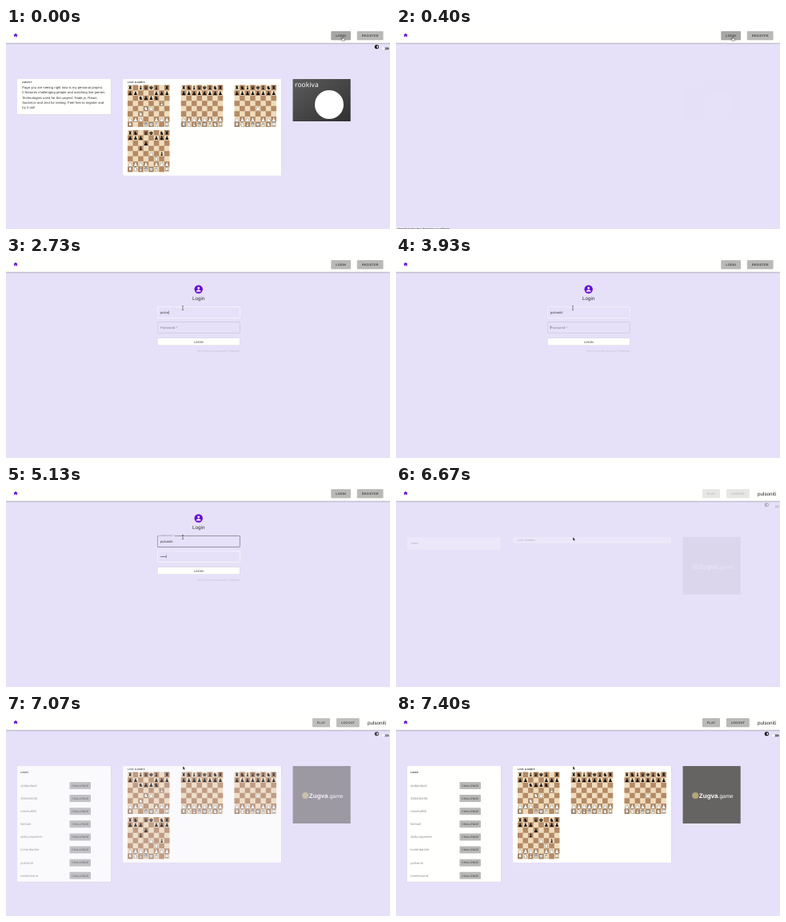
An HTML page that plays this animation: 480x252 px, repeating every 7470 ms.

```html
<!DOCTYPE html>
<html lang="en">
<head>
<meta charset="utf-8">
<title>Chess project login</title>
<style>
  html, body { margin: 0; width: 100%; height: 100%; overflow: hidden; background: #e6e1f8; }
  svg { display: block; width: 480px; height: 252px; }
  text {
    font: 4.16px "Liberation Sans", Arial, sans-serif;
    letter-spacing: .039px; fill: #333; text-rendering: geometricPrecision; white-space: pre;
  }
  .mid { text-anchor: middle; }
  .btn rect { fill: #b9b9b7; }
  .btn text { font-size: 3.9px; font-weight: bold; letter-spacing: .11px; fill: #4a4a4a; text-anchor: middle; }
  .btn.small text { font-size: 3.38px; font-weight: normal; letter-spacing: .09px; fill: #333; }
  .head { font-size: 3.12px; font-weight: bold; letter-spacing: .26px; }
  .card { fill: #fffffd; filter: drop-shadow(0 .6px .7px #0005); }
  .bar { fill: #fffffd; filter: drop-shadow(0 .6px .8px #0008); }
  .title { font-size: 6.24px; }
  .user { fill: #8c8c8c; }
  .piece { font: 6.5px "DejaVu Sans", sans-serif; letter-spacing: 0; text-anchor: middle; fill: #111; }
  .piece.w { fill: #fff; stroke: #444; stroke-width: .45px; paint-order: stroke; }

  .a, .a * { animation-timing-function: linear; }
  .a { animation-duration: 7470ms; animation-iteration-count: infinite; }

  .guest { animation-name: guest; }
  .form { animation-name: form; }
  .member { animation-name: member; }
  .photo { animation-name: photo; }
  .games { animation-name: games; }
  .list { animation-name: list; }
  .out { animation-name: out; }
  .in { animation-name: in; }
  .name { animation-name: name; }
  .hover { animation-name: hover; }
  .status { animation-name: status; }
  .mouse { animation-name: mouse; }
  .hand { animation-name: hand; }
  .beam { animation-name: beam; }
  .arrow { animation-name: arrow; }
  .box { fill: none; stroke: #aba6bb; stroke-width: .35px; }
  .box1 { animation-name: box1; }
  .box2 { animation-name: box2; }
  .label { fill: #817d8e; }
  .label1 { animation-name: label1; }
  .label2 { animation-name: label2; }
  .notch { fill: #e6e1f8; }
  .notch1 { animation-name: notch1; }
  .notch2 { animation-name: notch2; }

  @keyframes guest { 0%, .9% { opacity: 1 } 5.4%, 100% { opacity: 0 } }
  @keyframes form { 0%, 7% { opacity: 0 } 12.4% { opacity: .84 } 13.4%, 84.2% { opacity: 1 } 88%, 100% { opacity: 0 } }
  @keyframes member { 0%, 88% { opacity: 0 } 89.25%, 92.75% { opacity: .25 } 92.76% { opacity: .65 } 97.5%, 100% { opacity: 1 } }
  @keyframes photo { 0%, 88% { opacity: 0 } 89.25%, 92.75% { opacity: .08 } 92.76% { opacity: .36 } 98.5%, 100% { opacity: 1 } }
  @keyframes games { 0%, 92.75% { opacity: 0 } 92.76%, 100% { opacity: 1 } }
  @keyframes list { 0%, 93.68% { opacity: 0 } 93.69%, 100% { opacity: 1 } }
  @keyframes out { 0%, 84.2% { opacity: 1 } 87.5%, 100% { opacity: 0 } }
  @keyframes in { 0%, 88% { opacity: 0 } 89.25%, 92.75% { opacity: .35 } 92.76% { opacity: .82 } 96%, 100% { opacity: 1 } }
  @keyframes name { 0%, 88.3% { opacity: 0 } 88.31%, 100% { opacity: 1 } }
  @keyframes hover { 0%, 10.5% { opacity: .1 } 12.4% { opacity: .07 } 14.3%, 100% { opacity: 0 } }
  @keyframes status { 0%, 2.6% { opacity: 0 } 4.4%, 19.6% { opacity: 1 } 24%, 100% { opacity: 0 } }
  @keyframes mouse {
    0%, 8% { transform: translate(420.6px, 11.2px); animation-timing-function: ease-in-out }
    12.4%, 100% { transform: translate(221px, 64px) }
  }
  @keyframes hand { 0%, 8.7% { opacity: 1 } 8.71%, 100% { opacity: 0 } }
  @keyframes beam { 0%, 11.7% { opacity: 0 } 11.71%, 87.4% { opacity: 1 } 87.41%, 100% { opacity: 0 } }
  @keyframes arrow { 0%, 8.7% { opacity: 0 } 8.71%, 11.7% { opacity: 1 } 11.71%, 87.4% { opacity: 0 } 87.41%, 100% { opacity: 1 } }
  @keyframes box1 {
    0%, 11.7% { stroke: #aba6bb; stroke-width: .35px }
    11.71%, 15% { stroke: #33313c; stroke-width: .45px }
    16%, 52.6% { stroke: #fff; stroke-width: .6px }
    53.4%, 100% { stroke: #33313c; stroke-width: .45px }
  }
  @keyframes box2 { 0%, 52.6% { stroke: #aba6bb; stroke-width: .35px } 53.4%, 100% { stroke: #fff; stroke-width: .6px } }
  @keyframes label1 {
    0%, 15.1% { transform: translate(192.9px, 71px); fill: #817d8e }
    17.7%, 52.6% { transform: translate(192.9px, 63.4px) scale(.75); fill: #fff }
    53.4%, 100% { transform: translate(192.9px, 63.4px) scale(.75); fill: #817d8e }
  }
  @keyframes label2 {
    0%, 52.6% { transform: translate(192.9px, 89.6px); fill: #817d8e }
    54.4%, 100% { transform: translate(192.9px, 82.2px) scale(.75); fill: #fff }
  }
  @keyframes notch1 { 0%, 15.1% { opacity: 0 } 17.7%, 100% { opacity: 1 } }
  @keyframes notch2 { 0%, 52.6% { opacity: 0 } 54.4%, 100% { opacity: 1 } }
</style>
</head>
<body>
<svg viewBox="0 0 480 252">
  <defs>
    <linearGradient id="slate" x1="0" y1="0" x2="1" y2="1">
      <stop offset="0" stop-color="#5c5c5c"/><stop offset="1" stop-color="#303030"/>
    </linearGradient>
    <g id="boards"></g>
    <g id="theme">
      <circle cx="463.4" cy="23.6" r="2.7" fill="#16161c"/>
      <path d="M463.6 22a1.6 1.6 0 0 1 0 3.2z" fill="#fff"/>
      <rect x="472" y="24.2" width="7" height="3" rx="1.5" fill="#77747f"/>
      <circle cx="471.8" cy="25.6" r="2.2" fill="#f8f7fc" stroke="#0002" stroke-width=".3"/>
    </g>
  </defs>
  <rect width="480" height="252" fill="#e6e1f8"/>

  <g class="a guest">
    <use href="#theme"/>
    <rect class="card" x="14" y="64" width="117.5" height="44.4" rx="1"/>
    <text class="head" x="20.2" y="69">ABOUT</text>
    <g id="about"></g>
    <rect class="card" x="146" y="64" width="198.3" height="121" rx="1"/>
    <text class="head" x="152" y="69">LIVE GAMES</text>
    <use href="#boards"/>
    <rect x="358.5" y="64" width="72.2" height="53" fill="url(#slate)"/>
    <circle cx="404" cy="96" r="18" fill="#fff"/>
    <text x="361" y="74" style="font: 8.5px 'Noto Sans', sans-serif; fill: #fff">rookiva</text>
  </g>

  <g class="a member">
    <use href="#theme"/>
    <rect class="card" x="14" y="64" width="117.5" height="16" rx="1"/>
    <g class="a list">
      <rect class="card" x="14" y="64" width="117.5" height="145.4" rx="1"/>
      <g id="users"></g>
    </g>
    <text class="head" x="18.3" y="72.8">USER</text>
    <rect class="card" x="146" y="64" width="198.3" height="8.6" rx="1"/>
    <g class="a games">
      <rect class="card" x="146" y="64" width="198.3" height="121" rx="1"/>
      <use href="#boards"/>
    </g>
    <text class="head" x="152" y="69">LIVE GAMES</text>
  </g>
  <g class="a photo">
    <rect x="358.5" y="64" width="72.2" height="72" fill="#666463"/>
    <circle cx="374.2" cy="101" r="4" fill="#b3a678"/>
    <text x="378.8" y="104" style="font-size: 8px; font-weight: bold; fill: #fff">Zugva<tspan style="font-size: 6.8px; font-weight: normal">.game</tspan></text>
  </g>

  <g class="a form">
    <circle cx="240.7" cy="40.5" r="5.2" fill="#6808d8"/>
    <circle cx="240.7" cy="39" r="1.45" fill="#fff"/>
    <path d="M237.8 43.4c0-1.8 1.9-2.5 2.9-2.5s2.9.7 2.9 2.5z" fill="#fff"/>
    <text class="title mid" x="240.7" y="54">Login</text>

    <rect class="a box box1" x="189.3" y="62.6" width="103.1" height="13.9" rx="1"/>
    <rect class="a notch notch1" x="191.8" y="61.8" width="18.6" height="1.5"/>
    <text class="a label label1">Username *</text>
    <text id="login" x="192.9" y="71"></text>

    <rect class="a box box2" x="189.3" y="81.4" width="103.1" height="13.9" rx="1"/>
    <rect class="a notch notch2" x="191.8" y="80.6" width="18.2" height="1.5"/>
    <text class="a label label2">Password *</text>
    <text id="pass" x="192.9" y="89.6"></text>
    <rect id="caret" width=".35" height="4.4" fill="#222"/>

    <rect class="card" x="189.3" y="101.8" width="103.1" height="9" rx="1"/>
    <text class="mid" x="240.9" y="107.7" style="font-size: 3.64px; letter-spacing: .1px; fill: #222">LOGIN</text>
    <text x="292.4" y="119.2" text-anchor="end" style="font-size: 3.64px; fill: #c3bbdb">Don't have an account? Register</text>
  </g>

  <rect class="bar" x="-4" y="-4" width="488" height="22.8"/>
  <path transform="translate(8.9 6) scale(.26)" d="M10 20v-6h4v6h5v-8h3L12 3 2 12h3v8z" fill="#5b08d2"/>
  <g class="a out btn">
    <rect x="406.3" y="4" width="24.7" height="11.2" rx="1"/>
    <rect class="a hover" x="406.3" y="4" width="24.7" height="11.2" rx="1" style="fill: #000"/>
    <text x="418.6" y="11">LOGIN</text>
    <rect x="438.8" y="4" width="32.8" height="11.2" rx="1"/>
    <text x="455.2" y="11">REGISTER</text>
  </g>
  <g class="a in btn">
    <rect x="383" y="4" width="22" height="11.2" rx="1"/>
    <text x="394" y="11">PLAY</text>
    <rect x="413" y="4" width="28.8" height="11.2" rx="1"/>
    <text x="427.4" y="11">LOGOUT</text>
  </g>
  <text class="a name title" x="452" y="11.6" style="fill: #222">pulsoniti</text>

  <g class="a status">
    <rect y="249.4" width="68" height="3" fill="#efecf8"/>
    <text x="1" y="252.7" style="font-size: 3.9px">chessthingproject.demo/account/login</text>
  </g>

  <g class="a mouse">
    <path class="a hand" d="M-.5 0q.5-.5 1 0v1.7l2 .5q.5.2.4.8L2.5 5H-.4L-1.8 3q0-.7.7-.4l.6.5z" fill="#fff" stroke="#111" stroke-width=".45"/>
    <path class="a beam" d="M-.8-2.5H.8M0-2.5v5M-.8 2.5H.8" fill="none" stroke="#222" stroke-width=".5"/>
    <path class="a arrow" d="M.2.3v4l.9-.8.7 1.5.7-.3-.7-1.5h1.3z" fill="#111" stroke="#fff" stroke-width=".2"/>
  </g>
</svg>
<script>
  const $ = id => document.getElementById(id);
  const LOOP = 7470, CELL = 6.55;

  const board = (x, y, fen) => {
    let dark = '', pieces = '';
    for (let i = 0; i < 64; i++) {
      const c = i % 8, r = i >> 3;
      if ((c + r) % 2) dark += `M${c} ${r}h1v1h-1z`;
    }
    fen.split('/').forEach((row, r) => {
      let c = 0;
      for (const ch of row) {
        if (+ch) { c += +ch; continue; }
        const kind = 'kqrbnp'.indexOf(ch.toLowerCase());
        const side = ch < 'a' ? 'w' : 'b';
        pieces += `<text class="piece ${side}" x="${(c + .5) * CELL}" y="${(r + .5) * CELL + 2.35}">${String.fromCharCode(0x265A + kind)}</text>`;
        c++;
      }
    });
    return `<g transform="translate(${x} ${y})"><rect width="${8 * CELL}" height="${8 * CELL}" fill="#f0dcbc"/>
      <path transform="scale(${CELL})" d="${dark}" fill="#b48a66"/>${pieces}</g>`;
  };

  $('boards').innerHTML =
    board(152, 71.6, 'r1bqkb1r/pp3ppp/2nppn2/6B1/3NP3/2N5/PPP2PPP/R2QKB1R') +
    board(218.8, 71.6, 'rnbqkbnr/pppppppp/8/8/8/8/PPPPPPPP/RNBQKBNR') +
    board(285.5, 71.6, 'rnbqkbnr/pppppppp/8/8/4P3/8/PPPP1PPP/RNBQKBNR') +
    board(152, 128, 'rn1qk1nr/ppp2ppp/3p4/2b5/4P1b1/5N2/PPPP1PPP/RNBQKB1R');

  $('about').innerHTML = [
    'Page you are seeing right now is my personal project.',
    'It features challenging people and watching live games.',
    'Technologies used for this project: Node.js, React,',
    'Socket.io and Jest for testing. Feel free to register and',
    'try it out!'
  ].map((line, i) => `<text x="20.2" y="${76 + i * 6.3}">${line}</text>`).join('');

  $('users').innerHTML = [
    'qsdqsdqsd', '456456456', 'tomelu888', 'lioliooil',
    'dottycarpenter', 'lumenbastor', 'pulsoniti', 'tovelamund'
  ].map((user, i) => `<g class="btn small" transform="translate(0 ${i * 16.12})">
      <rect x="79.5" y="84" width="26.5" height="9" rx="1"/>
      <text x="92.8" y="89.7">CHALLENGE</text></g>
    <text class="user" x="18.2" y="${89.8 + i * 16.12}">${user}</text>`).join('');

  // Moments at which each character is typed
  const loginKeys = [1870, 2400, 2470, 2670, 2730, 3270, 3330, 3530, 3600];
  const passKeys = [4530, 4670, 4800, 5000, 5130, 5530, 5530, 5730, 5730];
  const typed = (keys, t) => keys.filter(k => k <= t + 2).length;

  const setText = (el, s) => { if (el.textContent !== s) el.textContent = s; };
  let start;
  const draw = now => {
    start ??= now;
    const t = (now - start) % LOOP;
    setText($('login'), 'pulsoniti'.slice(0, typed(loginKeys, t)));
    setText($('pass'), '•'.repeat(typed(passKeys, t)));
    const second = t >= 3930;
    const field = $(second ? 'pass' : 'login');
    const width = field.textContent ? field.getComputedTextLength() : 0;
    $('caret').setAttribute('x', 192.9 + width);
    $('caret').setAttribute('y', second ? 85.9 : 67.3);
    $('caret').setAttribute('opacity', t >= 1130 ? 1 : 0);
    requestAnimationFrame(draw);
  };
  requestAnimationFrame(draw);
</script>
</body>
</html>
```
